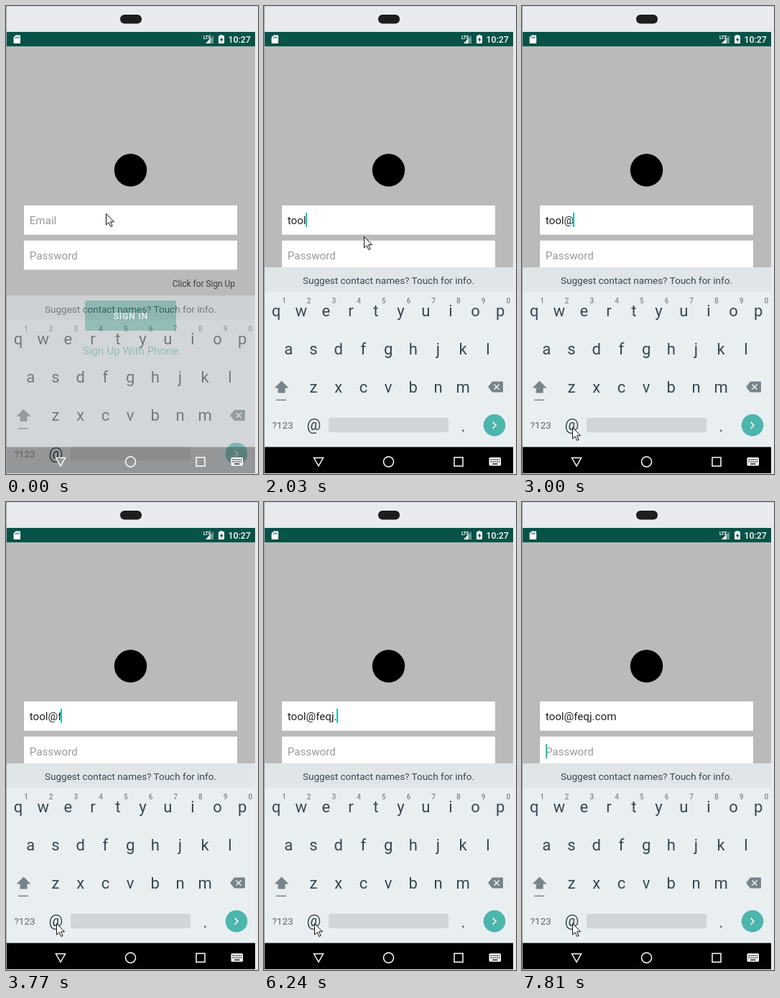
Write an HTML page that moves like this. It is 351x650 px and loops after 8000 ms.

```html
<!DOCTYPE html>
<html lang="en">
<head>
<meta charset="utf-8">
<title>Sign in form</title>
<style>
html, body { margin: 0; width: 100%; height: 100%; overflow: hidden; background: #e9eaed; }
svg { display: block; width: 351px; height: 650px; }
text { font-family: Roboto, sans-serif; white-space: pre; }
.mid { text-anchor: middle; }
.field { font-size: 15.2px; fill: #212121; }
.hint { fill: #999; }
.key { font-size: 22px; fill: #37474f; }
.digit { font-size: 10px; font-weight: 500; fill: #7b878d; }
.line { fill: none; stroke: #fff; stroke-width: 1.5; }
</style>
</head>
<body>
<svg viewBox="0 0 351 650">
  <defs><clipPath id="screen"><rect x="1" y="36" width="346" height="613"/></clipPath></defs>

  <!-- phone body -->
  <rect width="351" height="650" fill="#e9eaed"/>
  <rect width="351" height="1" fill="#d2d3d6"/>
  <rect x="159" y="12" width="30" height="12.5" rx="6" fill="#1e1e20"/>

  <g clip-path="url(#screen)">
    <rect x="1" y="36" width="346" height="614" fill="#bababa"/>

    <!-- login form -->
    <circle cx="173.5" cy="228" r="22.7"/>
    <rect x="25" y="277" width="297" height="40.6" fill="#fff"/>
    <rect x="25" y="325.8" width="297" height="40.4" fill="#fff"/>
    <text id="email" class="field" x="32.7" y="303.2"></text>
    <text class="field hint" x="32.7" y="352.2">Password</text>
    <rect id="caret" width="2" height="20" fill="#14c8b8"/>
    <g id="lower">
      <text x="319" y="390" font-size="11.9" text-anchor="end" fill="#3c3c3c">Click for Sign Up</text>
      <rect x="110" y="409" width="127" height="42" rx="3" fill="#2a7f6e"/>
      <text class="mid" x="174" y="435.2" font-size="12" font-weight="500" letter-spacing=".9" fill="#fff">SIGN IN</text>
      <text class="mid" x="173.3" y="484" font-size="15.2" fill="#2a7f6e">Sign Up With Phone</text>
    </g>

    <!-- keyboard -->
    <g id="board">
      <rect x="1" y="363" width="346" height="250" fill="#e9eef1"/>
      <rect x="1" y="363" width="346" height="34" fill="#e0e5e8"/>
      <text class="mid" x="173.5" y="386" font-size="13.5" fill="#37474f">Suggest contact names? Touch for info.</text>
      <g id="keys"></g>
      <path d="M24.5 520.5l10 10h-5v7h-10v-7h-5z" fill="#78848a"/>
      <rect x="17" y="546.5" width="14" height="1.5" fill="#78848a"/>
      <path d="M312 529l6-7.5h13.5q1.500 0 1.500 1.500v12q0 1.500-1.500 1.500H318z" fill="#78848a"/>
      <path d="M320.500 525.500l7 7m0-7l-7 7" stroke="#e9eef1" stroke-width="1.6"/>
      <text class="mid" x="26" y="587" font-size="13.5" fill="#5a676e">?123</text>
      <rect x="90" y="572" width="167" height="20" rx="2" fill="#d0d5d8"/>
      <text id="dot" class="key mid" x="277.5" y="590.5">.</text>
      <circle cx="321" cy="582.3" r="15.3" fill="#4db6ac"/>
      <path d="M318.500 577.800l4.500 4.500-4.500 4.500" class="line" stroke-width="2"/>
    </g>
    <text id="at" class="key mid" x="69.3" y="589.3">@</text>

    <!-- pressed key -->
    <g id="popup">
      <rect x="49" y="504" width="42" height="97" rx="3" fill="#9aa3a8" opacity=".6"/>
      <rect x="48.5" y="502" width="42" height="97" rx="3" fill="#cbd1d4"/>
      <text class="key mid" x="69.3" y="538" style="font-size:32px">@</text>
      <path d="M78.500 547.500h10" stroke="#7b878d" stroke-width="1.8" stroke-dasharray="1.8 2.2"/>
    </g>

    <!-- navigation bar -->
    <rect id="nav" x="1" y="612.5" width="346" height="38"/>
    <path class="line" d="M69.500 627.500h13l-6.500 11.500z"/>
    <circle class="line" cx="173.5" cy="633" r="7"/>
    <rect class="line" x="265" y="627" width="12" height="12"/>
    <rect x="313.5" y="627" width="16.5" height="11.5" rx="1.5" fill="#fff"/>
    <path d="M315.500 630h13m-13 3h13" stroke="#000" stroke-width="1.5" stroke-dasharray="1.5 1.3"/>
    <path d="M318 636h7.500" stroke="#000" stroke-width="1.3"/>

    <!-- status bar -->
    <rect x="1" y="36" width="346" height="20" fill="#085248"/>
    <path d="M13.500 40.500H19q1 0 1 1v9.500q0 1-1 1h-7.500q-1 0-1-1v-7.500z" fill="#fff"/>
    <path d="M13.700 42.500v2.500m2-2.500v2.500m2-2.500v2.500" stroke="#085248"/>
    <text x="275" y="45.5" font-size="6.5" font-weight="700" fill="#fff">LTE</text>
    <path d="M289 41v11h-11z" fill="#fff" opacity=".4"/>
    <path d="M284.500 45.500V52H278z" fill="#fff"/>
    <path d="M298.500 40h3v1.300h2.500V52h-8V41.300h2.500z" fill="#fff"/>
    <path d="M300.800 43l-3 4.300h1.800V50.500l3-4.500h-1.800z" fill="#085248"/>
    <text x="309.5" y="51" font-size="12.3" font-weight="500" fill="#fff">10:27</text>
  </g>
  <rect width="1" height="650" fill="#a4a6a8"/>

  <path id="mouse" d="M.5.5v15.500l3.600-3.400 2.700 5.900 2.300-1.100-2.600-5.700h5z" fill="#fff" stroke="#111"/>
</svg>
<script>
const LOOP = 8000;
const $ = id => document.getElementById(id);

// [start, text, caret shown]
const typing = [
  [0, '', 0], [500, 't', 1], [620, 'too', 1], [1000, 'tool', 1], [1500, 'tool', 0],
  [2030, 'tool', 1], [2510, 'tool', 0], [2880, 'tool@', 1], [3370, 'tool@', 0],
  [3770, 'tool@f', 1], [3920, 'tool@fe', 1], [4240, 'tool@feq', 1], [4610, 'tool@feq', 0],
  [5010, 'tool@feqj', 1], [5130, 'tool@feqj.', 1], [5750, 'tool@feqj', 1],
  [6240, 'tool@feqj.', 1], [6360, 'tool@feqj.c', 1], [6730, 'tool@feqj.co', 1],
  [6850, 'tool@feqj.com', 1], [7410, 'tool@feqj.com', 0], [7810, 'tool@feqj.com', 1]
];

// [start, x, y]
const pointer = [
  [0, 139, 288], [2030, 139, 320], [2150, 141, 385], [2270, 122, 480],
  [2390, 90, 560], [2510, 70, 595], [2760, 70, 590], [3000, 70, 585]
];

const at = (steps, t) => steps.filter(s => s[0] <= t).pop();
const show = (id, on) => $(id).setAttribute('visibility', on ? 'visible' : 'hidden');
const move = (id, x, y) => $(id).setAttribute('transform', `translate(${x} ${y})`);

const row = (chars, x, y, cls) => [...chars].map((c, i) =>
  `<text class="${cls} mid" x="${x + i * 34.7}" y="${y}">${c}</text>`).join('');

$('keys').innerHTML =
  row('qwertyuiop', 17, 430.5, 'key') +
  row('1234567890', 28, 412.5, 'digit') +
  row('asdfghjkl', 34.3, 483.5, 'key') +
  row('zxcvbnm', 69, 536.5, 'key');

function draw() {
  const t = performance.now() % LOOP;
  const [, text, caret] = at(typing, t);
  const [, x, y] = at(pointer, t);
  const opening = t < 500;
  const password = t >= 7810;
  const email = $('email');

  email.textContent = text || 'Email';
  email.classList.toggle('hint', !text);

  show('caret', caret);
  const end = password ? 33.7 : 32.7 + email.getComputedTextLength();
  move('caret', Math.round(end - 1), password ? 336 : 287);

  show('lower', opening);
  show('dot', !opening);
  $('board').setAttribute('opacity', opening ? 0.55 : 1);
  $('nav').setAttribute('opacity', opening ? 0.3 : 1);
  move('board', 0, opening ? 39.5 : 0);
  move('at', 0, opening ? 40 : 0);
  show('popup', t >= 2760 && t < 3000);
  move('mouse', x, y);
  requestAnimationFrame(draw);
}
draw();
</script>
</body>
</html>
```
